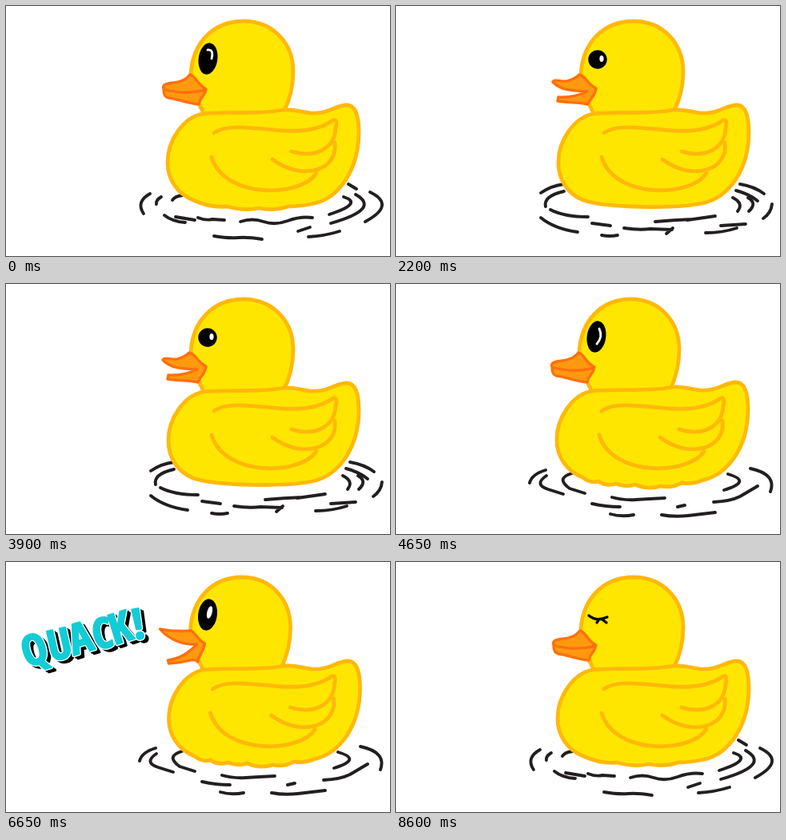
Recreate the animation shown at these times as an HTML page. Size 480 px wide and 313 px high, loop 8.7 s.

```html
<!DOCTYPE html>
<html lang="en">
<head>
<meta charset="utf-8">
<title>Rubber duck</title>
<style>
html, body { margin: 0; width: 100%; height: 100%; overflow: hidden; background: #fff; }
svg { display: block; width: 100%; height: 100%; }
path { stroke-linecap: round; stroke-linejoin: round; }
.skin { fill: #ffe600; stroke: #ffb80a; stroke-width: 4.8; }
.wing { fill: none; stroke: #ffb80a; stroke-width: 4.8; }
.beak { fill: #ff9a10; stroke: #ff700c; stroke-width: 3.4; }
.water { fill: none; stroke: #231f20; stroke-width: 3.9; }
.lash { fill: none; stroke: #000; stroke-width: 3.2; }
.glint { fill: none; stroke: #fff; stroke-width: 2.8; }
text {
  font-family: "Open Sans Condensed", "Open Sans", "Noto Sans", Lato, sans-serif;
  font-weight: 800; font-stretch: 75%; stroke-linejoin: round;
}
.shade { fill: #000; stroke: #000; stroke-width: 3; }
.rim { fill: #fff; stroke: #fff; stroke-width: 5; }
.face { fill: #12cdd6; stroke: #12cdd6; stroke-width: 2.4; }
</style>
</head>
<body>
<svg viewBox="0 0 480 313" preserveAspectRatio="none">
  <path class="water" id="water"/>
  <g id="head">
    <path class="skin" d="M246 136C247 129 241 126 241 121L243 104L231 86C233 44 261 19 297 19C333 19 359 46 359 82C359 101 355 117 347 133Z"/>
  </g>
  <path class="skin" id="body"/>
  <g id="wing" class="wing">
    <path d="M260 159C275 147 310 153 345 156C375 158 395 153 409 143C413 141 414 147 412 153C411 176 390 192 357 182"/>
    <path d="M411 171C416 204 372 221 333 192"/>
    <path d="M388 209C371 239 273 243 257 189"/>
  </g>
  <g id="face">
    <path class="beak" id="beak"/>
    <g id="eye"></g>
  </g>
  <g id="quack"></g>
</svg>
<script>
const $ = id => document.getElementById(id);

const bodyPath = (bottom, dx = 0) =>
  `M${246 + dx} 135C${222 + dx} 139 ${202 + dx} 168 ${202 + dx} 196C${202 + dx} 217 214 235 234 243` + bottom +
  'C416 240 441 205 441 158C441 138 437 124 426 124C412 124 402 136 380 134C366 132 360 129 347 130C318 136 278 132 246 135Z';

const smooth = 'C262 253 350 254 383 247';
const rippled = 'Q244 251 254 248Q264 255 276 251Q288 256 300 252Q316 259 332 254Q346 257 358 250Q372 252 383 247';

const poses = {
  A: {
    body: bodyPath('Q256 253 276 251Q298 257 316 253Q336 257 352 251Q368 251 386 247'),
    move: '', wing: '', face: '',
    water: `M180 235Q162 245 172 260M194 239Q187 243 188 248M221 237Q211 238 208 243
      M198 262Q208 270 224 271M212 264L236 268M240 265Q250 269 258 267L273 268
      M293 270Q308 265 322 270T352 269T383 265M260 288Q278 291 290 290T320 292
      M378 289Q398 288 417 282M365 282L380 277M428 223L438 229M455 233Q488 249 449 270
      M422 239Q447 247 404 261M437 236Q469 254 406 272`
  },
  B: {
    body: bodyPath(rippled),
    move: 'matrix(.977 0 0 1 3.3 0)', wing: 'translate(-3 0)', face: 'translate(-2 0)',
    water: `M187 233Q170 238 167 249M188 240Q172 251 190 257L209 263
      M220 237Q199 243 217 256L236 262M245 275Q262 279 280 279
      M270 267Q284 271 300 270T336 268M268 288Q282 292 297 289
      M332 289Q348 292 365 290T399 286M352 279L361 277
      M415 238Q446 247 410 258M397 273Q418 272 430 266L452 253M443 231Q476 238 468 260`
  },
  C: {
    body: bodyPath(smooth, 1),
    move: '', wing: '', face: '',
    water: `M181 234Q194 225 210 223M210 232Q184 238 187 251M193 255Q210 264 240 264
      M181 265Q198 279 227 283M245 272L268 275M257 287Q267 289 277 287
      M285 278Q304 281 318 279L345 280M324 270Q346 268 371 267M364 268L399 263
      M387 284Q408 284 426 278M338 285L346 278M406 275L437 273
      M430 223Q448 226 460 235M425 231Q441 235 452 244M440 240Q452 247 441 257
      M421 240Q435 247 427 257M470 248Q469 259 459 266`
  }
};

const beaks = {
  shut: 'M197 104C195 98 201 97 210 96C222 94 226 91 230 86C238 88 238 98 250 104C249 113 243 113 241 123C227 122 214 116 203 115C198 114 197 108 197 104C216 110 234 109 250 105C234 109 216 110 197 104Z',
  half: 'M196 95C198 91 206 95 214 94C222 92 225 90 229 86C238 88 239 98 250 103C249 113 243 115 240 123C227 120 213 121 202 119L203 114C215 115 228 112 239 107C222 106 206 106 196 95Z',
  wide: 'M193 84C207 87 220 87 232 86C239 90 240 98 249 102C247 114 242 115 240 125C236 119 227 126 204 127L203 123C219 121 231 112 239 103C224 104 206 99 193 84Z'
};

const oval = glint => '<ellipse cx="252.5" cy="66" rx="11.8" ry="19.8" transform="rotate(8 252.5 66)"/>' + glint;
const curve = d => `<path class="glint" d="${d}"/>`;
const eyes = {
  A: oval(curve('M252 55Q260 54 257 66')),
  B: oval(curve('M256 56Q261 66 253 75')),
  C: oval(curve('M254 55Q260 57 257 69')),
  wide: oval('<ellipse cx="255" cy="63" rx="3.2" ry="8" fill="#fff" transform="rotate(14 255 63)"/>'),
  dot: '<circle cx="252" cy="67" r="11.7"/><ellipse cx="257" cy="66" rx="2.6" ry="4" fill="#fff"/>',
  blink: '<path class="lash" d="M241 67Q250 75 264 69M253 73L251 76M258 72L263 76"/>'
};

const word = (cls, x, y) =>
  `<text class="${cls}" x="${x}" y="${y}" rotate="-3 2 -2 3 -3 4">QUACK!</text>`;
$('quack').innerHTML = '<g transform="translate(26 132) rotate(-14.5)">' +
  word('shade', 4, 5) + word('shade', 2, 3) + word('rim', 0, 0) + word('face', 0, 0) + '</g>';

// pick the type size at which the word spans 154 units
const quack = $('quack');
quack.style.fontSize = '50px';
const span = quack.querySelector('text').getComputedTextLength();
quack.style.fontSize = Math.min(54, 50 * 154 / span) + 'px';

// start time, pose, action
const steps = [
  [0, 'A'], [150, 'C'], [300, 'B'], [450, 'A'], [600, 'C'], [750, 'B'],
  [900, 'A', 'blink'], [1000, 'C'], [1100, 'B'], [1200, 'A'],
  [1300, 'C', 'half'], [1400, 'B', 'quack'], [1600, 'A', 'quack'], [1750, 'C', 'half'],
  [1900, 'B'], [2050, 'A'],
  [2200, 'C', 'half'], [2300, 'B', 'quack'], [2500, 'A', 'quack'], [2800, 'C', 'half'],
  [3000, 'C'], [3200, 'B'], [3400, 'A'],
  [3500, 'C', 'half'], [3600, 'B', 'quack'], [3750, 'A', 'quack'], [3900, 'C', 'half'],
  [4050, 'B'], [4250, 'A', 'blink']
];
const period = 4350;

function show([, name, action]) {
  const pose = poses[name];
  const loud = action === 'quack';
  const nudge = loud && name === 'B' ? 'translate(1.5 0) ' : '';
  $('water').setAttribute('d', pose.water);
  $('body').setAttribute('d', pose.body);
  $('body').setAttribute('transform', nudge || (name === 'B' ? 'translate(-1 -1)' : ''));
  $('head').setAttribute('transform', nudge + pose.move);
  $('wing').setAttribute('transform', nudge + pose.wing);
  $('face').setAttribute('transform', loud ? 'translate(-.5 0)' : pose.face);
  $('beak').setAttribute('d', beaks[loud ? 'wide' : action === 'half' ? 'half' : 'shut']);
  $('eye').innerHTML = eyes[loud ? 'wide' : action === 'half' ? 'dot' : action || name];
  quack.style.display = loud ? '' : 'none';
  quack.setAttribute('transform',
    name === 'A' ? 'translate(178 95) scale(1.075) translate(-178 -95)' : '');
}

let current;
function tick() {
  const t = performance.now() % period;
  const step = steps.findLast(s => s[0] <= t);
  if (step !== current) show(current = step);
  requestAnimationFrame(tick);
}
tick();
</script>
</body>
</html>
```
